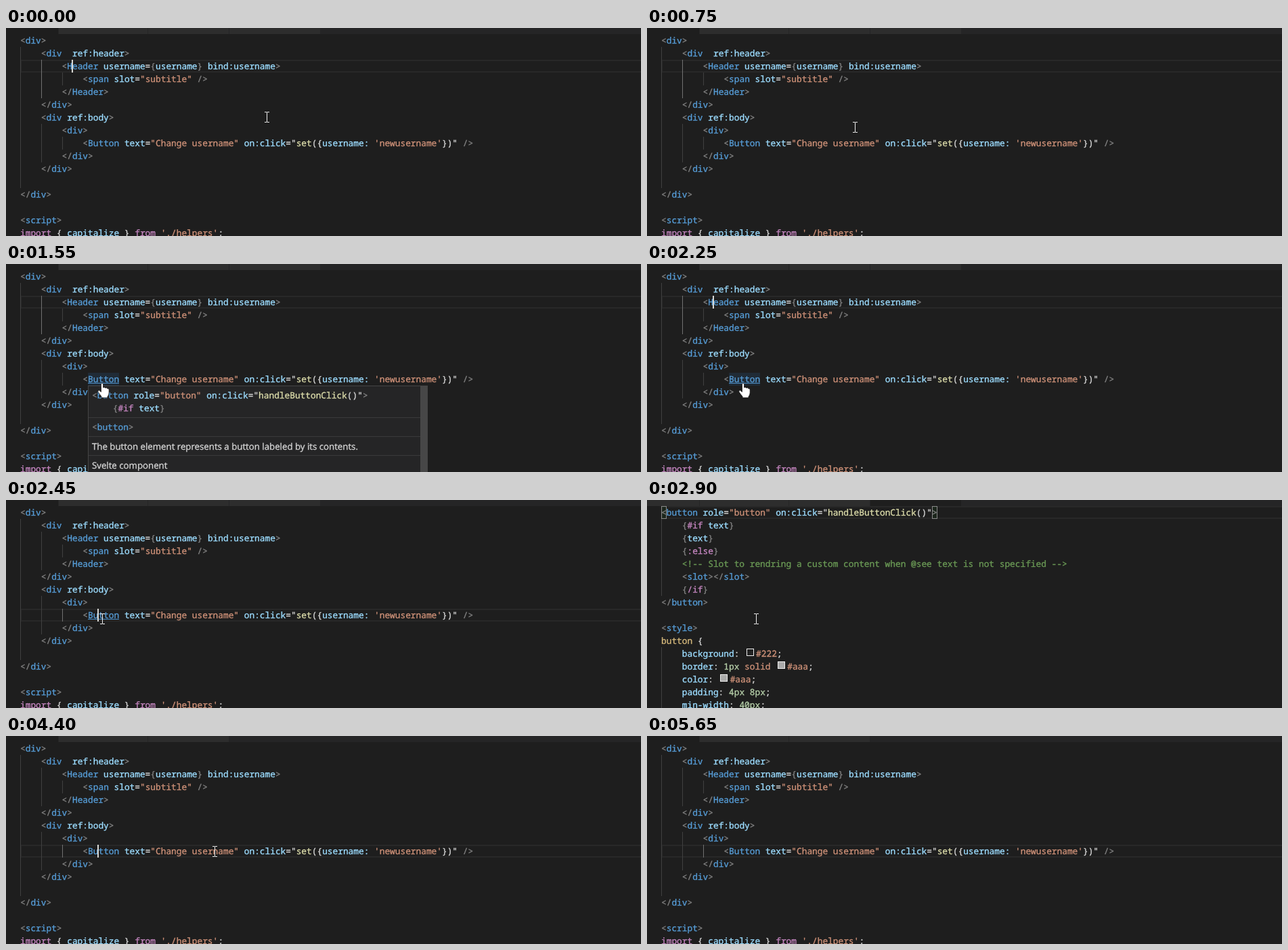
Write an HTML page that moves like this. It is 938x308 px and loops after 5700 ms.

```html
<!DOCTYPE html>
<html lang="en">
<head>
<meta charset="utf-8">
<title>Component hover and go to definition</title>
<style>
  html, body { margin: 0; width: 100%; height: 100%; overflow: hidden; background: #1e1e1e; }
  svg { display: block; width: 938px; height: 308px; overflow: hidden; }
  text {
    font: 12.828px "Noto Sans Mono", "DejaVu Sans Mono", monospace;
    white-space: pre;
    text-rendering: geometricPrecision;
    font-variant-ligatures: none;
    stroke-width: .35px;
  }
  .prose { font: 13.26px "Open Sans", "Noto Sans", sans-serif; fill: #d4d4d4; stroke: #d4d4d4; }
</style>
</head>
<body>
<svg id="stage" viewBox="0 0 938 308"></svg>
<script>
const LOOP = 5700, LEFT = 21, TOP = 9, ROW = 19, ADVANCE = 7.697;
const BG = '#1e1e1e', STRIP = '#252526', TAB = '#2d2d2d';

// "~x" switches the colour of the text that follows; "~s" also draws a colour swatch.
const COLORS = {
  g: '#808080', b: '#569cd6', a: '#9cdcfe', o: '#ce9178', w: '#d4d4d4', f: '#dcdcaa',
  k: '#c586c0', c: '#6a9955', n: '#b5cea8', y: '#d7ba7d', s: '#ce9178'
};

const BUTTON_TAG = '~g<~bbutton ~arole~w=~o"button" ~aon:click~w="~fhandleButtonClick~w()"~g>';

const PAGE = [
  '~g<~bdiv~g>',
  '    ~g<~bdiv  ~aref:header~g>',
  '        ~g<~bHeader ~ausername~w=~g{~ausername~g} ~abind:username~g>',
  '            ~g<~bspan ~aslot~w=~o"subtitle" ~g/>',
  '        ~g</~bHeader~g>',
  '    ~g</~bdiv~g>',
  '    ~g<~bdiv ~aref:body~g>',
  '        ~g<~bdiv~g>',
  '            ~g<~bButton ~atext~w=~o"Change username" ~aon:click~w="~fset~w({~ausername: ~o\'newusername\'~w})" ~g/>',
  '        ~g</~bdiv~g>',
  '    ~g</~bdiv~g>',
  '',
  '~g</~bdiv~g>',
  '',
  '~g<~bscript~g>',
  '~kimport ~w{ ~acapitalize ~w} ~kfrom ~o\'./helpers\'~w;'
];

const COMPONENT = [
  BUTTON_TAG,
  '    ~g{~k#if ~atext~g}',
  '    ~g{~atext~g}',
  '    ~g{~k:else~g}',
  '    ~c<!-- Slot to rendring a custom content when @see text is not specified -->',
  '    ~g<~bslot~g></~bslot~g>',
  '    ~g{~k/if~g}',
  '~g</~bbutton~g>',
  '',
  '~g<~bstyle~g>',
  '~ybutton ~w{',
  '    ~abackground~w: ~s#222~w;',
  '    ~aborder~w: ~n1px ~osolid ~s#aaa~w;',
  '    ~acolor~w: ~s#aaa~w;',
  '    ~apadding~w: ~n4px 8px~w;',
  '    ~amin-width~w: ~n40px~w;'
];

const stage = document.getElementById('stage');

function add(parent, name, attrs = {}, content = '') {
  const el = document.createElementNS('http://www.w3.org/2000/svg', name);
  for (const key in attrs) el.setAttribute(key, attrs[key]);
  el.textContent = content;
  return parent.appendChild(el);
}
const group = (parent = stage) => add(parent, 'g');
const rect = (parent, x, y, width, height, fill, more = {}) =>
  add(parent, 'rect', { x, y, width, height, fill, ...more });
const rowTop = row => TOP + ROW * (row - 1);
const colX = col => LEFT + ADVANCE * col;
const show = (el, visible) => el.setAttribute('visibility', visible ? 'visible' : 'hidden');

function codeLine(parent, x, top, source) {
  const indent = source.search(/[^ ]|$/);
  const text = add(parent, 'text', { x: x + indent * ADVANCE, y: top + 14 });
  const parts = source.slice(indent).split(/~(.)/);
  let col = indent;
  for (let i = 1; i < parts.length; i += 2) {
    const token = parts[i + 1], color = COLORS[parts[i]];
    const attrs = { fill: color, stroke: color };
    if (parts[i] === 's') {
      attrs.dx = 17;
      rect(parent, Math.floor(x + col * ADVANCE) + 3.5, top + 2.5, 10, 10, token, { stroke: '#eee' });
    }
    add(text, 'tspan', attrs, token);
    col += token.length;
  }
}

const codeBlock = (parent, lines) =>
  lines.forEach((line, i) => line && codeLine(parent, LEFT, rowTop(i + 1), line));

const guide = (parent, col, from, to, fill = '#404040') =>
  rect(parent, Math.round(colX(col)), rowTop(from), 1, ROW * (to - from + 1), fill);

const currentLine = (parent, row) =>
  rect(parent, 22, rowTop(row) + 1, 930, ROW - 2, 'none', { stroke: '#282828', 'stroke-width': 2 });

// Tab strip
rect(stage, 0, 0, 938, TOP, STRIP);
const tabEdges = [0, 78, 210, 330, 465];
const tabs = tabEdges.slice(0, -1).map((x, i) => rect(stage, x, 0, tabEdges[i + 1] - x - 1, TOP, TAB));

// Page view
const page = group();
const onHeader = group(page), onButton = group(page);
currentLine(onHeader, 3);
currentLine(onButton, 9);
guide(page, 0, 2, 12);
guide(page, 4, 3, 5);
guide(page, 4, 8, 10);
guide(page, 8, 4, 4);
guide(page, 8, 9, 9);
const activeGuides = [[4, 3, 5], [8, 9, 9]].map(g => guide(page, ...g, '#707070'));
const linkBack = rect(page, 121, rowTop(9), 46, ROW, '#202b36');
codeBlock(page, PAGE);
const underline = rect(page, 121, rowTop(9) + 15, 46, 1, '#4e94ce');

// Component view
const component = group();
currentLine(component, 1);
guide(component, 0, 2, 7);
guide(component, 0, 12, 16);
for (const col of [0, 52])
  rect(component, Math.round(colX(col)) + .5, TOP + .5, 7, ROW - 1, 'rgba(0,100,0,.1)', { stroke: '#888' });
codeBlock(component, COMPONENT);

const caret = rect(stage, 0, 0, 2, ROW, '#d8d8d4');

// Hover popup
const popup = group();
rect(popup, 121.5, 180.5, 501, 140, STRIP, { stroke: '#454545' });
for (const y of [227, 255, 283]) rect(popup, 122, y, 490, 1, '#3a3a3b');
codeLine(popup, 127, 185, BUTTON_TAG);
codeLine(popup, 127, 204, '    ~g{~k#if ~atext~g}');
codeLine(popup, 127, 232, '~g<~bbutton~g>');
add(popup, 'text', { x: 127, y: 275, class: 'prose' }, 'The button element represents a button labeled by its contents.');
add(popup, 'text', { x: 127, y: 303, class: 'prose' }, 'Svelte component');
rect(popup, 612, 181, 10, 127, '#474747');

// Mouse pointers, drawn around their hot spot
const beam = add(stage, 'path', {
  d: 'M-3-7.5h3M1-7.5h3M.5-7.5v15M-3 7.5h3M1 7.5h3', fill: 'none', stroke: '#f0f0f0'
});
const hand = add(stage, 'path', {
  d: 'M-1.6 1.6Q0-.6 1.6 1.6V7Q3.4 5.8 4.6 7.5Q6.6 6.4 7.6 8.3Q9.8 7.8 10.2 10V15Q10 18 8 20.5V22H-1V20.2Q-4 16.5-6 13.5Q-6.8 10.6-4.4 11L-1.6 13.4Z',
  fill: '#fff', stroke: '#111', 'stroke-width': .8
});

// [time, x, y]
const mousePath = [
  [0, 385, 132], [600, 385, 132], [1000, 140, 180], [1200, 140, 180], [1300, 140, 179],
  [1400, 142, 176], [2850, 142, 176], [2900, 161, 176], [3050, 308, 171],
  [4450, 308, 171], [4900, 874, 300], [LOOP, 874, 300]
];
const caretToggles = [450, 950, 1450, 2050, 2550, 3000, 3500, 4050, 4900, 5450, 5650];

function mouseAt(t) {
  const i = mousePath.findIndex(p => p[0] > t);
  const [t0, x0, y0] = mousePath[i - 1], [t1, x1, y1] = mousePath[i];
  const u = (t - t0) / (t1 - t0), s = u * u * (3 - 2 * u);
  return [Math.round(x0 + (x1 - x0) * s), Math.round(y0 + (y1 - y0) * s)];
}

function render(t) {
  const inComponent = t >= 2550 && t < 4400;
  const clicked = t >= 2350;
  const link = t >= 1200 && t < 2550;
  const pointing = t >= 1200 && t < 2400;

  page.style.display = inComponent ? 'none' : '';
  component.style.display = inComponent ? '' : 'none';
  show(onHeader, !clicked);
  show(onButton, clicked);
  show(activeGuides[0], !clicked);
  show(activeGuides[1], clicked);
  show(linkBack, link && !clicked);
  show(underline, link);

  tabs.forEach((tab, i) => {
    const closed = i === 3 && t >= 4400;
    tab.setAttribute('fill', closed ? STRIP : i === (inComponent ? 3 : 0) ? BG : TAB);
  });

  const [cx, cy] = inComponent ? [21, rowTop(1)] : clicked ? [135, rowTop(9)] : [97, rowTop(3)];
  caret.setAttribute('x', cx);
  caret.setAttribute('y', cy);
  show(caret, caretToggles.filter(at => at <= t).length % 2 === 0);

  show(popup, t >= 1500 && t < 2250);
  popup.setAttribute('opacity', t < 1550 ? .5 : 1);

  const place = `translate(${mouseAt(t)})`;
  beam.setAttribute('transform', place);
  hand.setAttribute('transform', place);
  show(hand, pointing);
  show(beam, !pointing && t < 4950);
}

const start = performance.now();
function tick() {
  const t = (performance.now() - start) % LOOP;
  render(Math.floor(t / 50) * 50);
  requestAnimationFrame(tick);
}
tick();
</script>
</body>
</html>
```
